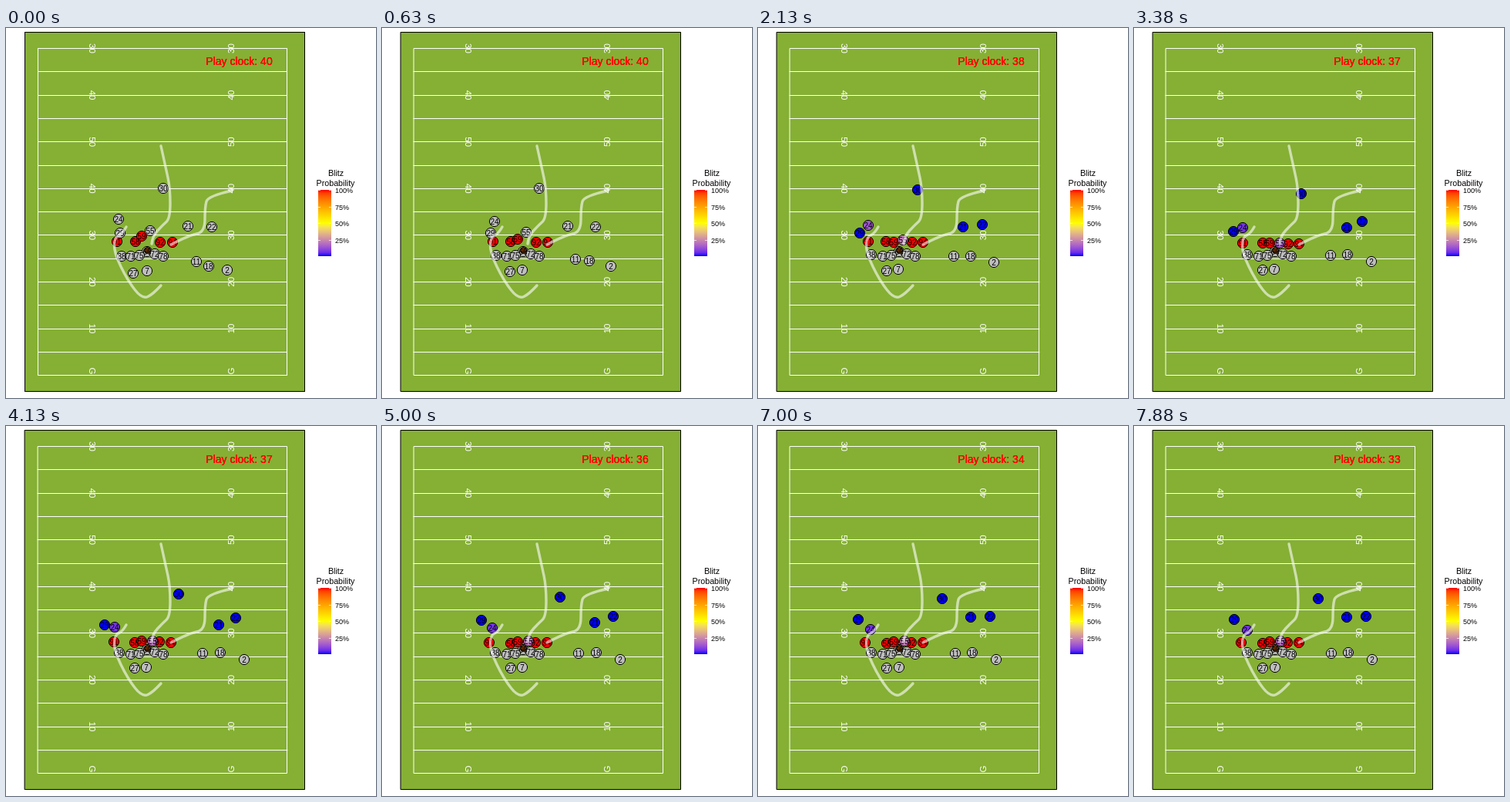
These frames come from a looping animation (480 px wide and 480 px high, 8 s). An HTML page with a canvas:

```html
<!DOCTYPE html>
<html>
<head>
<meta charset="utf-8">
<style>
  html, body { margin: 0; width: 100%; height: 100%; overflow: hidden; background: #fff; }
  canvas { display: block; width: 480px; height: 480px; }
</style>
</head>
<body>
<canvas id="stage" width="480" height="480"></canvas>
<script>
const ctx = document.getElementById('stage').getContext('2d');
const LOOP = 8000, STEP = 125, CLOCK_STEPS = 9, REVEAL_STEP = 14;
const FONT = '"Liberation Sans", Arial, sans-serif';
const GREY = '#bebebe', RED = '#ff0000';

// Progress from 0 to 1: quick start that levels off, or a soft start and stop
const settle = (s, tau) => 1 - Math.exp(-s / tau);
const glide = (s, from, to) => {
  const u = Math.min(Math.max((s - from) / (to - from), 0), 1);
  return u * u * (3 - 2 * u);
};

const still = (x, y) => () => [x, y];
const shift = (x, y, dx, dy, tau) => s => [x + dx * settle(s, tau), y + dy * settle(s, tau)];

const offense = {
  71: still(162, 296),
  75: still(173, 295),
  66: still(183, 290),
  72: still(193, 293),
  78: still(204, 296),
  38: shift(150, 296, -3, -2, 4),
  27: shift(165, 318, 2, -4, 9),
  7: s => [183 - glide(s, 0, 8) + glide(s, 50, 60), 315 - 2.3 * settle(s, 6)],
  11: shift(247, 303, 8.6, -8, 9),
  18: shift(263, 309, 15, -15.3, 9),
  2: shift(287, 314, 22, -11, 8)
};
const rushers = {
  91: s => [144 - 5 * glide(s, 8, 40), 276.5 + 4.5 * glide(s, 12, 40)],
  58: s => [168 - 3 * glide(s, 0, 10) + 2 * glide(s, 12, 27), 277 + 5 * glide(s, 17, 40)],
  59: shift(176, 270, 0, 9.8, 10),
  92: s => [200 - 1.3 * glide(s, 17, 45), 278 + 2.8 * glide(s, 10, 40)],
  94: s => [216 - 2 * settle(s, 5), 278 + 3 * glide(s, 10, 40)]
};
const backs = {
  30: s => [204 + 35 * glide(s, 8, 54), 208 + 16 * glide(s, 8, 50)],
  24: s => [146 - 5 * glide(s, 4, 27) + 6 * glide(s, 27, 63), 248 + 19 * settle(s, 30)],
  29: s => [148 - 21.5 * settle(s, 12) + 3.5 * glide(s, 28, 50), 265.6 - 14.5 * glide(s, 22, 44)],
  21: s => [235 + 41 * glide(s, -2, 26), 257 + 2 * glide(s, 10, 27) - 11 * glide(s, 26, 58)],
  22: s => [267 + 35 * settle(s, 15), 258 - 11 * glide(s, 4, 44)],
  55: s => [187 + 2.5 * glide(s, 0, 30), 262.6 + 16.4 * glide(s, -3, 27)]
};
const blitzChance = {
  24: s => 0.07 + 0.07 * (1 - glide(s, 17, 27)),
  55: s => 0.19 + 0.03 * Math.cos((s - 17) / 3.2)
};

const routes = [
  [[201, 153], [207, 180], [213, 208], [213, 247], [203, 256], [190, 270], [189, 280]],
  [[293, 211], [262, 218], [258, 232], [258, 265], [237, 269], [214, 281]],
  [[156, 258], [151, 267], [141, 271], [140, 291], [158, 328], [177, 352], [191, 345], [201, 334]]
];

// Blue, yellow and red in CIE Lab
const LAB = [[32.3, 79.2, -107.9], [97.1, -21.6, 94.5], [53.2, 80.1, 67.2]];

function scaleColor(p) {
  const i = p < 0.5 ? 0 : 1, u = p * 2 - i;
  const [l, a, b] = LAB[i].map((v, k) => v + (LAB[i + 1][k] - v) * u);
  const f = (l + 16) / 116;
  const linear = t => t > 6 / 29 ? t ** 3 : (t - 4 / 29) * 108 / 841;
  const x = 0.9505 * linear(f + a / 500), y = linear(f), z = 1.089 * linear(f - b / 200);
  const channel = v => {
    const c = Math.min(Math.max(v, 0), 1);
    return Math.round(255 * (c < 0.0031 ? 12.92 * c : 1.055 * c ** (1 / 2.4) - 0.055));
  };
  const r = channel(3.2406 * x - 1.5372 * y - 0.4986 * z);
  const g = channel(-0.9689 * x + 1.8758 * y + 0.0415 * z);
  return `rgb(${r},${g},${channel(0.0557 * x - 0.204 * y + 1.057 * z)})`;
}

function text(str, x, y, size, color, align = 'center') {
  ctx.font = `${size}px ${FONT}`;
  ctx.textAlign = align;
  ctx.textBaseline = 'alphabetic';
  ctx.fillStyle = color;
  ctx.fillText(str, x, y + size * 0.36);
}

function turnedText(str, x, y, angle) {
  ctx.save();
  ctx.translate(x, y);
  ctx.rotate(angle);
  text(str, 0, 0, 11.5, '#fff');
  ctx.restore();
}

function disc(x, y, r, fill) {
  ctx.beginPath();
  ctx.arc(x, y, r, 0, Math.PI * 2);
  ctx.fillStyle = fill;
  ctx.fill();
  ctx.strokeStyle = '#000';
  ctx.lineWidth = 1;
  ctx.stroke();
}

function drawField() {
  ctx.fillStyle = '#fff';
  ctx.fillRect(0, 0, 480, 480);
  ctx.fillStyle = '#85b034';
  ctx.fillRect(24, 5, 364, 467);
  ctx.lineWidth = 1;
  ctx.strokeStyle = '#000';
  ctx.strokeRect(24.5, 5.5, 363, 466);
  ctx.strokeStyle = '#fff';
  ctx.strokeRect(41.5, 26.5, 323, 424);
  ctx.beginPath();
  for (let i = 1; i < 14; i++) {
    const y = Math.round(26.1 + i * 424 / 14) + 0.5;
    ctx.moveTo(41, y);
    ctx.lineTo(365, y);
  }
  ctx.stroke();
  ['30', '40', '50', '40', '30', '20', '10', 'G'].forEach((label, i) => {
    const y = label === 'G' ? 445 : 26.5 + i * 60.57;
    turnedText(label, 112, y, Math.PI / 2);
    turnedText(label, 292, y, -Math.PI / 2);
  });
}

function drawLegend() {
  text('Blitz', 428, 188, 10.7, '#000');
  text('Probability', 427.5, 201, 10.7, '#000');
  const top = 210, height = 86, stops = 20;
  const fill = ctx.createLinearGradient(0, top, 0, top + height);
  for (let i = 0; i <= stops; i++) fill.addColorStop(i / stops, scaleColor(1 - i / stops));
  ctx.fillStyle = fill;
  ctx.fillRect(405, top, 17, height);
  for (let i = 0; i < 4; i++) {
    const y = Math.round(top + i * 21.6);
    ctx.fillStyle = '#fff';
    ctx.fillRect(405, y, 3, 0.7);
    ctx.fillRect(419, y, 3, 0.7);
    text(100 - 25 * i + '%', 427, y + 0.5, 9, '#000', 'left');
  }
}

function drawRoute(points) {
  ctx.beginPath();
  ctx.moveTo(...points[0]);
  const last = points.length - 1;
  for (let i = 1; i < last; i++) {
    const [x, y] = points[i], [nx, ny] = points[i + 1];
    if (i === last - 1) ctx.quadraticCurveTo(x, y, nx, ny);
    else ctx.quadraticCurveTo(x, y, (x + nx) / 2, (y + ny) / 2);
  }
  ctx.strokeStyle = 'rgba(255,255,255,0.6)';
  ctx.lineWidth = 3.4;
  ctx.lineCap = ctx.lineJoin = 'round';
  ctx.stroke();
}

function drawPlayers(step) {
  const place = (team, color) => Object.entries(team).map(([label, move]) => {
    const [x, y] = move(step).map(Math.round);
    return { label, x, y, color: color(label) };
  });
  const chance = label => blitzChance[label] ? blitzChance[label](step) : 0;
  const players = [
    ...place(offense, () => GREY),
    ...place(rushers, () => RED),
    ...place(backs, label => step < REVEAL_STEP ? GREY : scaleColor(chance(label)))
  ];
  for (const p of players) disc(p.x, p.y, 6.6, p.color);
  disc(183.5, 288.5, 4, '#6b3000');
  for (const p of players) text(p.label, p.x, p.y, 10, '#000');
}

function frame(now) {
  const step = Math.floor((now % LOOP) / STEP + 0.05);
  drawField();
  drawLegend();
  drawPlayers(step);
  routes.forEach(drawRoute);
  const clock = 40 - Math.floor((step + 1) / CLOCK_STEPS);
  for (let i = 0; i < 3; i++) text('Play clock: ' + clock, 302.5, 43, 14, RED);
  requestAnimationFrame(frame);
}
requestAnimationFrame(frame);
</script>
</body>
</html>
```
